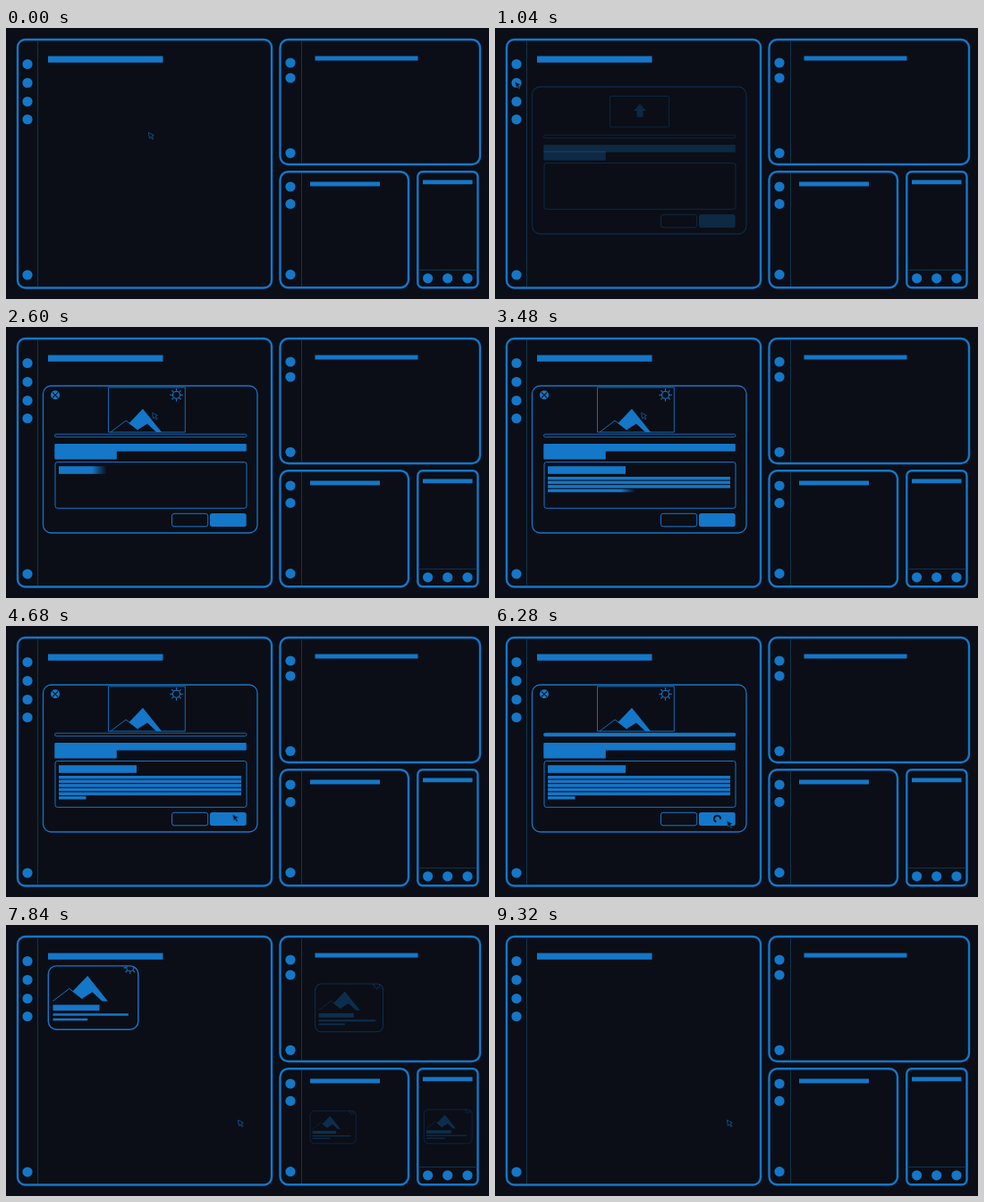
These frames come from a looping animation (540x304 px, 9360 ms). An HTML page with a canvas:

```html
<!DOCTYPE html>
<html>
<head>
<meta charset="utf-8">
<style>
html, body { margin: 0; width: 100%; height: 100%; overflow: hidden; background: #0b0e17; }
canvas { display: block; width: 540px; height: 304px; }
</style>
</head>
<body>
<canvas id="stage"></canvas>
<script>
const LOOP = 9360, STEP = 40;
const BLUE = '#1477c8', DARK = '#0b0e17', FAINT = '#11324d';
const canvas = document.getElementById('stage');
const ctx = canvas.getContext('2d');
const dpr = window.devicePixelRatio || 1;
canvas.width = 540 * dpr;
canvas.height = 304 * dpr;

const clamp = v => Math.max(0, Math.min(1, v));
const span = (t, a, b) => clamp((t - a) / (b - a));
const ease = p => p < 0.5 ? 2 * p * p : 1 - 2 * (1 - p) * (1 - p);

function bar(x, y, w, h, r = 0) {
  ctx.fillStyle = BLUE;
  ctx.beginPath();
  ctx.roundRect(x, y, w, h, r);
  ctx.fill();
}

function frame(x, y, w, h, r, line) {
  ctx.strokeStyle = BLUE;
  ctx.lineWidth = line;
  ctx.beginPath();
  ctx.roundRect(x, y, w, h, r);
  ctx.stroke();
}

function dot(x, y, r = 5.6) {
  ctx.fillStyle = BLUE;
  ctx.beginPath();
  ctx.arc(x, y, r, 0, Math.PI * 2);
  ctx.fill();
}

function path(points, closed = true) {
  ctx.beginPath();
  points.forEach(([x, y]) => ctx.lineTo(x, y));
  if (closed) ctx.closePath();
}

function rule(x1, y1, x2, y2) {
  ctx.strokeStyle = FAINT;
  ctx.lineWidth = 1;
  path([[x1, y1], [x2, y2]], false);
  ctx.stroke();
}

// Fades and transforms stay inside the callback.
function layer(alpha, draw) {
  if (alpha <= 0) return;
  ctx.save();
  ctx.globalAlpha *= alpha;
  draw();
  ctx.restore();
}

function drawPanels() {
  frame(13, 13, 284, 278.5, 8.5, 2.4);
  frame(306.5, 13, 223.5, 140, 9, 2.4);
  frame(306.5, 161.3, 143.5, 130, 9, 2.4);
  frame(460.3, 161.3, 67.2, 130, 5.5, 2.4);
  rule(35.5, 14.5, 35.5, 290);
  rule(330.5, 14.5, 330.5, 151.5);
  rule(330.5, 163, 330.5, 290);
  rule(461.5, 271.5, 526.5, 271.5);
  [40.5, 61.5, 82.5, 102.5, 277].forEach(y => dot(24, y));
  [39, 56, 140.3, 178, 197.4, 276.6].forEach(y => dot(318, y));
  [471.6, 493.7, 516].forEach(x => dot(x, 280.8));
  bar(47, 31.5, 128.5, 7.2);
  bar(345.5, 31.5, 115, 5);
  bar(340, 172.6, 78, 4.8);
  bar(466, 170.5, 55.5, 4.8);
}

// Origin is the lower left corner of the range.
function drawMountains(x, y, scale) {
  ctx.save();
  ctx.translate(x, y);
  ctx.scale(scale, scale);
  ctx.fillStyle = BLUE;
  path([[36, -26.3], [57, 0], [51, 0], [41, -9.5], [30, -2.5], [20.5, -10]]);
  ctx.fill();
  ctx.strokeStyle = BLUE;
  ctx.lineWidth = 0.9;
  path([[0, 0], [17, -13], [31, -2.5]], false);
  ctx.stroke();
  ctx.restore();
}

function drawSun(x, y) {
  ctx.strokeStyle = BLUE;
  ctx.lineWidth = 1.1;
  ctx.beginPath();
  ctx.arc(x, y, 4, 0, Math.PI * 2);
  ctx.stroke();
  for (let i = 0; i < 8; i++) {
    const a = i * Math.PI / 4, c = Math.cos(a), s = Math.sin(a);
    path([[x + 4.5 * c, y + 4.5 * s], [x + 7.2 * c, y + 7.2 * s]], false);
    ctx.stroke();
  }
}

function drawUpload() {
  frame(128.5, 76.5, 66, 34.5, 1, 0.9);
  ctx.fillStyle = BLUE;
  path([[162, 85], [169, 93], [165.5, 93], [165.5, 100], [158.5, 100], [158.5, 93], [155, 93]]);
  ctx.fill();
}

function drawPicture() {
  frame(114.5, 67.8, 85.8, 50.2, 0, 0.9);
  drawMountains(117, 118, 1);
  drawSun(190.5, 76.3);
  dot(55, 76.3, 5);
  ctx.strokeStyle = DARK;
  ctx.lineWidth = 1.1;
  [-1, 1].forEach(k => {
    path([[52, 76.3 - 3 * k], [58, 76.3 + 3 * k]], false);
    ctx.stroke();
  });
}

// Reveals a text bar from left to right behind a soft edge.
function wipe(x, y, w, h, p) {
  if (p <= 0) return;
  const soft = 16, edge = x + p * (w + soft);
  const fill = ctx.createLinearGradient(edge - soft, 0, edge, 0);
  fill.addColorStop(0, BLUE);
  fill.addColorStop(1, 'rgba(20,119,200,0)');
  ctx.fillStyle = fill;
  ctx.fillRect(x, y, Math.min(w, edge - x), h);
}

function drawText(t) {
  wipe(59, 156.2, 87, 8.6, span(t, 2320, 2860));
  for (let i = 0; i < 6; i++) {
    const start = 2860 + i * 180;
    wipe(59, 168 + i * 4.6, i < 5 ? 204 : 30.5, 3.5, span(t, start, start + (i < 5 ? 180 : 60)));
  }
}

function drawSpinner(t) {
  const turn = (t - 6280) / 1000 * Math.PI * 2;
  ctx.strokeStyle = DARK;
  ctx.lineWidth = 1.8;
  ctx.beginPath();
  ctx.arc(248.5, 216.3, 3.6, turn + 1.9, turn + 6.4);
  ctx.stroke();
}

function drawDialog(t) {
  frame(41.5, 66, 239.5, 165, 9, 1.3);
  layer(1 - span(t, 1880, 2000), drawUpload);
  layer(span(t, 1960, 2160), drawPicture);
  frame(54.5, 120.2, 214.5, 3.2, 1.6, 0.9);
  const done = ease(span(t, 5480, 6240));
  if (done > 0) bar(54.5, 119.9, 214.5 * done, 3.8, 1.7);
  bar(54.3, 131, 214.5, 8.4, 1);
  bar(54.3, 138, 69.5, 10.5, 1);
  frame(55, 151.5, 214, 51.8, 2.5, 1);
  drawText(t);
  frame(185.5, 209.3, 40.2, 14.5, 2.5, 1);
  bar(228, 209, 40.7, 15, 2.5);
  layer(span(t, 4840, 4960), () => drawSpinner(t));
}

function drawCard(x, y, scale) {
  ctx.save();
  ctx.translate(x, y);
  ctx.scale(scale, scale);
  frame(0, 0, 100.5, 71.3, 9, 1.4);
  ctx.save();
  ctx.beginPath();
  ctx.roundRect(0, 0, 100.5, 71.3, 9);
  ctx.clip();
  drawSun(91.5, 2);
  ctx.restore();
  drawMountains(5, 39.5, 1.08);
  bar(5.2, 43.6, 52, 6.4);
  bar(5.2, 53.3, 84.3, 2.5);
  bar(5.2, 58.9, 38.8, 2.4);
  ctx.restore();
}

function drawCards(t) {
  const out = 1 - span(t, 8920, 9320);
  layer(span(t, 7360, 7680) * out, () => drawCard(47.3, 45.9, 1));
  layer(span(t, 7720, 8120) * out, () => {
    drawCard(345.7, 66, 0.755);
    drawCard(340, 208.7, 0.51);
    drawCard(467.3, 207, 0.535);
  });
}

// Each stop: start time, end time, x, y.
const stops = [
  [0, 0, 159.3, 117.3],
  [160, 840, 22.5, 60.5],
  [1160, 1760, 163.5, 96.2],
  [3960, 4600, 253.5, 211.8],
  [4880, 5240, 259.3, 218.8]
];

function drawCursor(t) {
  let [, , x, y] = stops[0];
  for (const [a, b, nx, ny] of stops.slice(1)) {
    const p = ease(span(t, a, b));
    x += (nx - x) * p;
    y += (ny - y) * p;
  }
  ctx.save();
  ctx.translate(x, y);
  path([[0, 0], [6, 3], [3.8, 4], [5.6, 6.8], [4.3, 7.6], [2.6, 4.9], [1.2, 6.5]]);
  ctx.fillStyle = DARK;
  ctx.fill();
  ctx.strokeStyle = '#125c9a';
  ctx.lineWidth = 0.8;
  ctx.stroke();
  ctx.restore();
}

function render(t) {
  ctx.setTransform(dpr, 0, 0, dpr, 0, 0);
  ctx.fillStyle = DARK;
  ctx.fillRect(0, 0, 540, 304);
  drawPanels();
  layer(span(t, 960, 1280) * (1 - span(t, 6760, 7080)), () => drawDialog(t));
  drawCards(t);
  drawCursor(t);
}

const begin = performance.now();
function tick() {
  const t = (performance.now() - begin) % LOOP;
  render(Math.floor(t / STEP) * STEP);
  requestAnimationFrame(tick);
}
tick();
</script>
</body>
</html>
```
